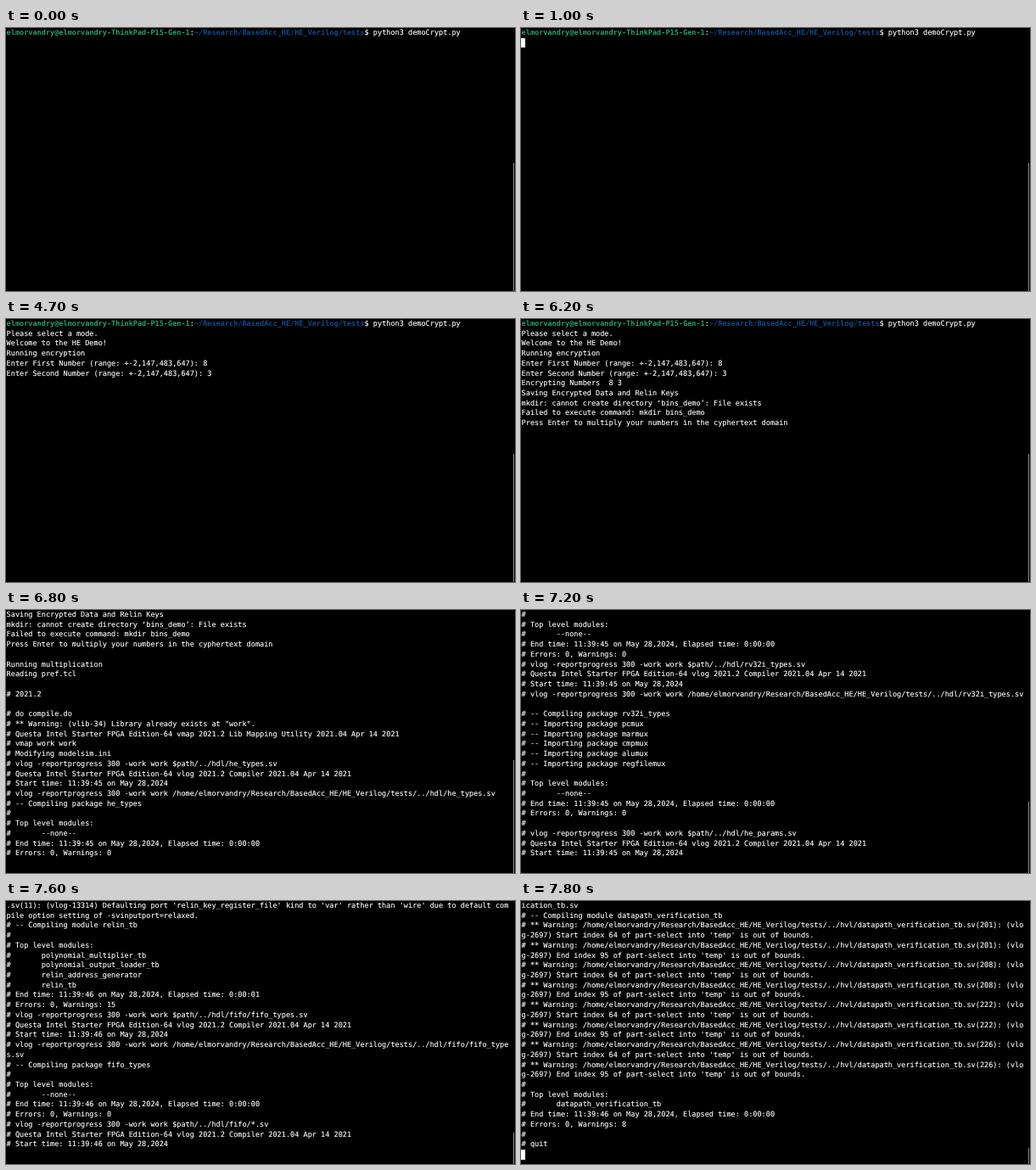
An HTML page that plays this animation: 600x310 px, repeating every 8 s.

```html
<!DOCTYPE html>
<html lang="en">
<head>
<meta charset="utf-8">
<title>Terminal session</title>
<style>
html, body { margin: 0; width: 100%; height: 100%; overflow: hidden; background: #000; }
#term { position: relative; width: 600px; height: 310px; overflow: hidden; background: #000; }
#text {
  position: absolute; left: .6px; top: 1px; margin: 0; color: #fff;
  font: 8.566px/11.72px "DejaVu Sans Mono", "Noto Sans Mono", monospace;
  font-variant-ligatures: none; text-rendering: geometricPrecision; white-space: pre;
  -webkit-text-stroke: .12px;
}
#text b { color: #26a269; -webkit-text-stroke: 0; }
#text b + b { color: #12488b; }
#cursor { position: absolute; width: 5.16px; height: 11.72px; background: #fff; }
#thumb { position: absolute; left: 598px; bottom: 0; width: 1px; background: #8c8c8c; }
</style>
</head>
<body>
<div id="term"><pre id="text"></pre><div id="cursor"></div><div id="thumb"></div></div>
<script>
const LOOP = 8000, COLS = 115, ROWS = 26, CELL_W = 5.157, CELL_H = 11.72;
const SCROLLBACK = 27.4; // rows already above the screen
const USER = 'elmorvandry';
const TESTS = `/home/${USER}/Research/BasedAcc_HE/HE_Verilog/tests/../`;
const QUESTA = '# Questa Intel Starter FPGA Edition-64 ';
const BUILD = '2021.04 Apr 14 2021';

const rows = [];
let second = 45;

// Adds lines, wrapped at the terminal width.
function print(...lines) {
  for (const line of lines)
    for (let i = 0; i <= line.length; i += COLS) rows.push(line.slice(i, i + COLS));
}

const clock = () => `11:39:${second} on May 28,2024`;
const compiling = (kind, name) => `# -- Compiling ${kind} ${name}`;
const warning = (file, line, text) => `# ** Warning: ${TESTS}${file}.sv(${line}): ${text}`;
const portWarning = (file, line, port) => warning(file, line,
  `(vlog-13314) Defaulting port '${port}' kind to 'var' rather than 'wire' due to default compile option setting of -svinputport=relaxed.`);

// Prints one compiler run; returns the row reached once its header is out.
function compile(target, body, { files = [target], tops = ['--none--'], took = 0, warnings = 0 } = {}) {
  const vlog = '# vlog -reportprogress 300 -work work ';
  print(`${vlog}$path/../${target}.sv`, `${QUESTA}vlog 2021.2 Compiler ${BUILD}`, `# Start time: ${clock()}`);
  const mark = rows.length;
  print(vlog + files.map(f => `${TESTS}${f}.sv`).join(' '), ...body);
  second += took;
  print('#', '# Top level modules:', ...tops.map(t => `#       ${t}`),
    `# End time: ${clock()}, Elapsed time: 0:00:0${took}`, `# Errors: 0, Warnings: ${warnings}`);
  return mark;
}

// Compiles a directory of similar modules, the first few with a warning each.
function compileAll(dir, bases, warned, extra = [], options = {}) {
  const parts = ['multiplier', 'output_loader', 'address_generator', 'register_file', 'accumulator', 'buffer'];
  const names = bases.flatMap(b => parts.map(p => `${b}_${p}`));
  const body = names.flatMap((name, i) => [
    ...(i < warned ? [portWarning(`${dir}/${name}`, 7 + i * 5 % 23, `${name}_in`)] : []),
    compiling('module', name)
  ]);
  compile(`${dir}/*`, [...body, ...extra],
    { files: names.map(n => `${dir}/${n}`), tops: [names.at(-1)], warnings: warned, ...options });
}

const range = '(range: +-2,147,483,647): ';
print(
  `${USER}@${USER}-ThinkPad-P15-Gen-1:~/Research/BasedAcc_HE/HE_Verilog/tests$ python3 demoCrypt.py `,
  'Please select a mode.', 'Welcome to the HE Demo!', 'Running encryption',
  `Enter First Number ${range}8`, `Enter Second Number ${range}3`,
  'Encrypting Numbers  8 3', 'Saving Encrypted Data and Relin Keys',
  'mkdir: cannot create directory ‘bins_demo’: File exists',
  'Failed to execute command: mkdir bins_demo',
  'Press Enter to multiply your numbers in the cyphertext domain', '',
  'Running multiplication', 'Reading pref.tcl', '', '# 2021.2', '', '# do compile.do',
  '# ** Warning: (vlib-34) Library already exists at "work".',
  `${QUESTA}vmap 2021.2 Lib Mapping Utility ${BUILD}`, '# vmap work work', '# Modifying modelsim.ini');

const muxes = ['pcmux', 'marmux', 'cmpmux', 'alumux', 'regfilemux'];
compile('hdl/he_types', [compiling('package', 'he_types')]);
compile('hdl/rv32i_mux_types', muxes.map(m => compiling('package', m)));
compile('hdl/rv32i_types',
  [compiling('package', 'rv32i_types'), ...muxes.map(m => `# -- Importing package ${m}`)]);
print('#');
const paramsRow = compile('hdl/he_params', [compiling('package', 'he_params')]);

compileAll('hdl', ['polynomial', 'relin', 'ntt', 'ciphertext'], 14, [
  portWarning('hdl/relin/relin_key_register_file_accessor', 11, 'relin_key_register_file'),
  compiling('module', 'relin_tb')
], {
  tops: ['polynomial_multiplier_tb', 'polynomial_output_loader_tb', 'relin_address_generator', 'relin_tb'],
  took: 1, warnings: 15
});
compile('hdl/fifo/fifo_types', [compiling('package', 'fifo_types')]);
const fifos = ['fifo', 'fifo_reader', 'fifo_writer', 'fifo_tb'];
const fifoRow = compile('hdl/fifo/*', fifos.map(f => compiling('module', f)),
  { files: fifos.map(f => `hdl/fifo/${f}`), tops: ['fifo_tb'] });

compileAll('hdl/cpu', ['fetch', 'decode', 'execute', 'memory', 'writeback'], 15);
compileAll('hdl/cache', ['line', 'tag'], 6);

const bench = 'datapath_verification_tb';
const outOfBounds = [201, 208, 222, 226].flatMap(line => ['Start index 64', 'End index 95'].map(index =>
  warning(`hvl/${bench}`, line, `(vlog-2697) ${index} of part-select into 'temp' is out of bounds.`)));
compile(`hvl/${bench}`, [compiling('module', bench), ...outOfBounds], { tops: [bench], warnings: 8 });
print('#', '# quit');

const mix = (a, b, k) => Math.round(a + (b - a) * k);

// [ms, cursor row, cursor column, cursor shown]; all text before the cursor is out.
const steps = [
  [0, 0, 105, 0], [600, 0, 105, 1], [1000, 1, 0, 1],
  [1200, 4, 45, 1], [1600, 4, 45, 0], [2200, 4, 45, 1], [2800, 4, 45, 0], [3100, 4, 46, 1],
  [3800, 5, 46, 1], [4200, 5, 47, 1], [4700, 5, 47, 0],
  [5200, 11, 0, 1], [5700, 11, 0, 0], [6300, 13, 0, 1],
  [6700, 17, 0, 0], [6800, 32, 0, 0], [6900, 47, 0, 0], [7200, paramsRow, 0, 0],
  ...[1, 2, 3].map(i => [7200 + i * 100, mix(paramsRow, fifoRow, i / 4), 0, 0]),
  [7600, fifoRow, 0, 0], [7700, mix(fifoRow, rows.length, .5), 0, 0], [7800, rows.length, 0, 1]
];

const [text, cursor, thumb] = ['text', 'cursor', 'thumb'].map(id => document.getElementById(id));
let shown;

function draw(step) {
  const [, row, col, on] = step;
  const top = Math.max(0, row - ROWS + 1);
  const view = rows.slice(top, row);
  view.push((rows[row] || '').slice(0, col));
  if (!top) view[0] = view[0].replace(/^(.*?):(.*?)\$/, '<b>$1</b>:<b>$2</b>$$');
  text.innerHTML = view.join('\n');
  cursor.style.left = col * CELL_W + 'px';
  cursor.style.top = (row - top) * CELL_H + 'px';
  cursor.hidden = !on;
  thumb.style.height = 310 * ROWS / (SCROLLBACK + ROWS + top) + 'px';
}

function tick() {
  const t = performance.now() % LOOP;
  const step = steps.findLast(s => s[0] <= t);
  if (step !== shown) draw(shown = step);
  requestAnimationFrame(tick);
}
tick();
</script>
</body>
</html>
```
